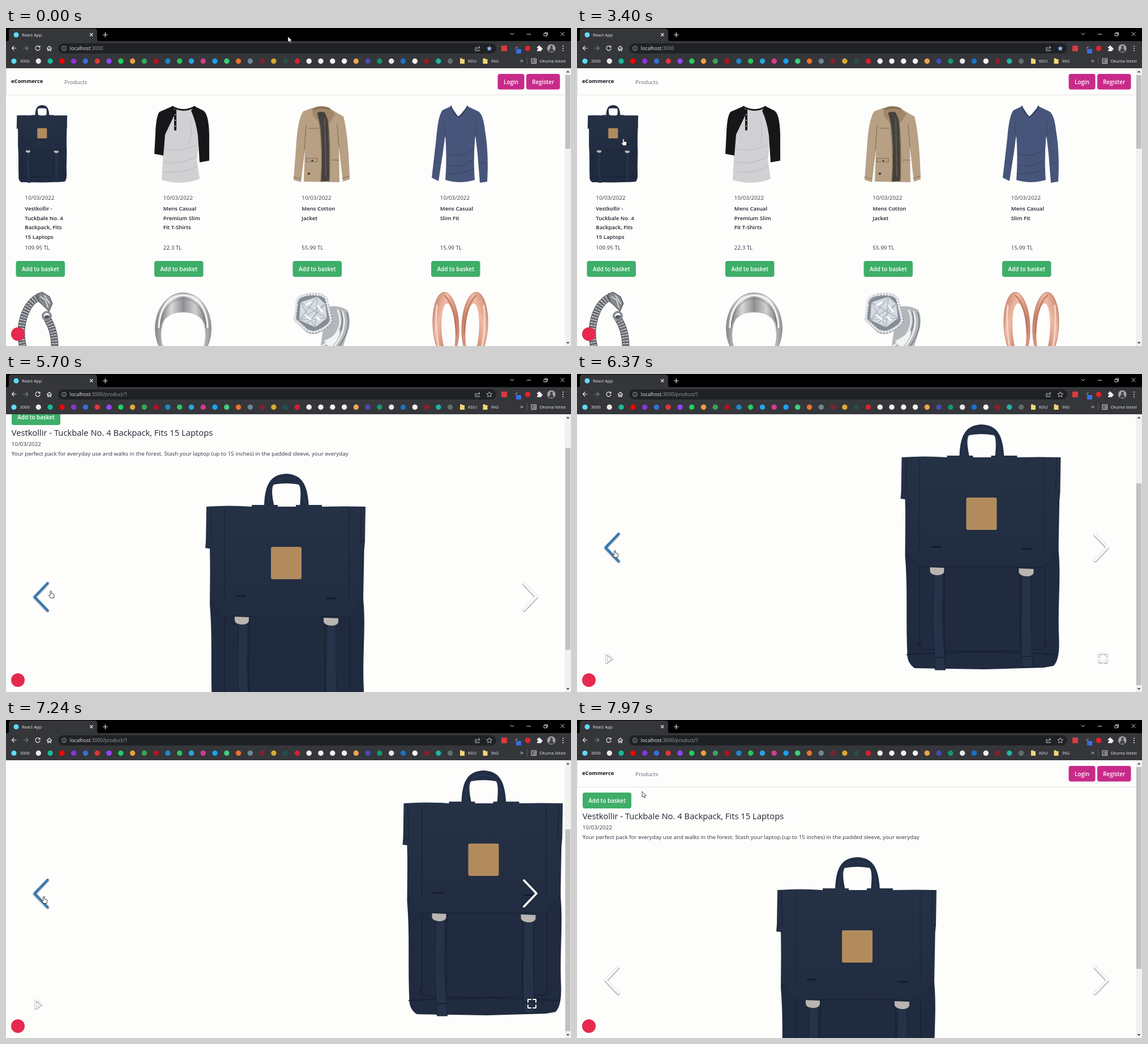
Recreate the animation shown at these times as an HTML page. Size 998 by 561 pixels, loop 8000 ms.

```html
<!DOCTYPE html>
<html lang="en">
<head>
<meta charset="utf-8">
<title>Shop demo</title>
<style>
  html, body { margin: 0; width: 100%; height: 100%; overflow: hidden; background: #fdfdfc; }
  svg { display: block; width: 998px; height: 561px; font-family: "Open Sans", "Noto Sans", sans-serif; }
  .line { fill: none; stroke-linecap: round; stroke-linejoin: round; }
  .control { filter: drop-shadow(0 1.4px 1.2px #1a1a1aaa); }
</style>
</head>
<body>
<svg id="stage" viewBox="0 0 998 561" xmlns="http://www.w3.org/2000/svg"></svg>
<script>
const LOOP = 8000, MAX_SCROLL = 153, SLIDE_WIDTH = 987, SLIDE_TIME = 440;
const OPENED = 3700, SLIDES = [6309, 7139], COLUMN = 244.5;

// Markup helpers
const path = (d, fill, more = '') => `<path d="${d}" fill="${fill}" ${more}/>`;
const line = (d, stroke, width = 1, more = '') =>
  `<path class="line" d="${d}" stroke="${stroke}" stroke-width="${width}" ${more}/>`;
const rect = (x, y, w, h, fill, r = 0) =>
  `<rect x="${x}" y="${y}" width="${w}" height="${h}" rx="${r}" fill="${fill}"/>`;
const circle = (x, y, r, fill, more = '') => `<circle cx="${x}" cy="${y}" r="${r}" fill="${fill}" ${more}/>`;
const text = (x, y, size, fill, value, weight = 400) =>
  `<text x="${x}" y="${y}" font-size="${size}" fill="${fill}" font-weight="${weight}">${value}</text>`;
const button = (x, y, w, h, fill, label) =>
  rect(x, y, w, h, fill, 4) +
  `<text x="${x + w / 2}" y="${y + h / 2 + 4}" font-size="9.9" fill="#fff" font-weight="600" text-anchor="middle">${label}</text>`;

const INK = '#1e2430', GREY = '#9aa0a6', LIGHT = '#e8eaed', GREEN = '#3eae68', PINK = '#c82a8a';

const bag = `<g id="bag">
  ${path('M456 147 C457 113 464 90 495 89 C526 90 533 113 535 147 H519 C521 125 521 113 517 108 Q495 104 473 108 C469 113 469 125 474 147Z', '#222e44')}
  ${line('M463 142 C464 112 472 97 495 97 C518 97 526 112 528 142', '#313e54', 1)}
  ${path('M361 205 L360 320 C365 380 361 430 364 495 Q364 510 377 519 L500 521 L605 518 L622 515 Q633 505 632 470 C629 410 636 360 631 310 L633 205Z', '#202b3f')}
  ${path('M354 147 Q395 144 434 147 V144 H480 V147 H512 V144 H558 V147 Q600 146 635 147 L634 208 L633 220 L629 222 L631 310 L604 341 Q500 339 382 341 L362 313 L360 221 L352 220 L353 208Z', 'url(#cloth)')}
  ${line('M362 313 L382 341 Q500 339 604 341 L631 310 M354 208 L363 209 M633 208 L627 209 M361 148 L363 208 M628 148 L626 208 M386 150 V310 M606 150 V310', '#172133', 1)}
  ${line('M386 343 V480 M607 343 V480 M430 342 Q428 440 430 487 M563 342 V487 M380 474 L392 486 Q500 492 604 485 L613 475', '#151e2e', 1.2)}
  ${line('M364 495 Q500 486 628 495', '#18233a', 3)}
  ${line('M407 305 H423 M567 309 H583', '#111a2a', 2.5)}
  ${path('M411 353 H427 L426 440 L431 522 H413 L409 440Z M567 355 H583 V440 L585 517 H566 L565 440Z', '#263249', 'stroke="#172133"')}
  ${line('M413 500 H430 M566 498 H584', '#141d2e', 1.5)}
  ${path('M404 341 L429 342 V349 Q427 355 416 355 Q405 354 404 348Z M561 343 L587 344 V351 Q585 357 574 357 Q563 356 561 350Z', '#b9b5b0')}
  ${rect(468, 218, 54, 57, '#b28b5d', 3)}
</g>`;

const shirt = path('M297 140 Q314 148 331 140 L340 165 Q342 200 337 232 L342 266 Q310 279 275 268 Q277 225 281 180 L287 155Z', '#d1d1d4')
  + line('M282 213 Q300 220 337 207 M280 236 Q310 243 337 226 M279 254 Q315 257 338 244 M325 165 Q330 190 322 205', '#bcbcc0', 1.2)
  + path('M294 138 L271 148 Q265 156 264 185 L262 222 L278 225 L281 188 L300 148Z M333 138 L349 146 Q358 152 359 188 L359 234 L342 237 L339 190 Q336 166 327 146Z', '#17171a')
  + line('M294 139 Q314 150 333 139', '#17171a', 3) + line('M299 145 V179', '#17171a', 4)
  + [153, 163, 173].map(y => circle(299, y, 1, '#ddd')).join('');

const jacket = path('M541 141 L525 147 Q516 160 513 200 L508 268 L521 272 L528 215 L526 271 L589 272 L588 210 L595 271 L607 267 Q605 190 596 156 L573 143Z', '#b7a084')
  + path('M549 148 L567 147 Q572 185 571 270 L556 271 Q560 215 555 172Z', '#45423d')
  + line('M563 160 L565 262', '#5e5b53', 2)
  + path('M541 142 Q556 134 572 141 L582 152 L571 168 L563 149 Q556 146 549 150 L553 168 L542 154Z', '#a18768')
  + line('M545 143 Q557 138 570 143', '#6e5a45', 1.6)
  + line('M553 166 Q560 215 556 271 M569 164 Q574 215 571 271 M527 215 L530 172 M588 210 L585 170 M508 263 L521 266 M594 265 L606 262', '#846e55', 1.2)
  + line('M530 230 H550 V236 H530Z M575 233 H588 M535 177 H551', '#7f6a52', 1.1)
  + circle(541, 234, 1.6, '#3a3028') + circle(535, 257, 2, '#3a3028');

const sweater = path('M786 138 L771 145 Q763 155 760 195 L752 264 L764 270 L772 218 L776 188 Q779 230 776 268 Q802 276 828 268 Q825 230 829 188 L833 222 L837 273 L850 271 Q853 220 846 180 Q843 152 834 147 L815 138 L799 157Z', '#47557a')
  + line('M786 138 Q790 151 799 157 Q810 150 815 138', '#36415d', 2)
  + line('M776 192 L774 166 M829 192 L831 166 M780 222 Q805 230 825 214 M779 242 Q805 248 826 232 M779 257 Q810 258 826 248 M757 235 L767 238 M836 240 L848 236', '#3a4764', 1.2);

const chain = (d, width) => line(d, '#56595d', width)
  + line(d, '#b4b7bb', width - 2, 'stroke-dasharray="2.6 2.4" style="stroke-linecap:butt"') + line(d, '#777b80', 1.3);
const bracelet = chain('M31 566 C20 530 33 484 60 474', 13) + chain('M73 513 Q87 535 86 566', 13)
  + path('M55 469 L64 466 L77 474 L82 486 L76 500 L65 489 L58 483Z', '#85888c', 'stroke="#3c3f42"')
  + line('M61 474 L70 480 L74 493 M68 472 L77 486', '#e4e6e8', 1.6)
  + circle(72, 508, 7, 'none', 'stroke="#8a8d91" stroke-width="4"');

const band = '<ellipse cx="313" cy="530" rx="49.5" ry="63" fill="url(#steel)" stroke="#898b8e"/>'
  + '<ellipse cx="313" cy="542" rx="39" ry="50" fill="#fdfdfc"/>'
  + path('M271 530 C272 486 296 474 313 474 C330 474 354 486 355 530 C345 492 281 492 271 530Z', 'url(#inside)')
  + line('M270 528 C272 453 354 453 356 528', '#f4f4f4', 3.2)
  + line('M273 530 C276 460 350 460 353 530', '#77797c', 1);

const diamond = path('M555 566 L566 492 Q588 488 603 498 Q609 510 606 528 L594 566Z', '#b3b7bb')
  + line('M556 562 C588 545 596 520 586 498 M576 566 C596 545 602 520 594 500', '#eceeef', 3)
  + line('M566 562 C594 542 598 520 592 500 M588 562 C604 540 608 520 602 502', '#73777c', 1.6)
  + path('M572 566 Q591 548 590 532 Q578 545 562 552Z', '#f2f3f3')
  + path('M513 488 Q510 470 536 468 Q562 465 568 478 L577 514 Q577 526 554 537 Q542 543 530 536 L508 515Z', '#878d95')
  + line('M513 488 Q512 472 536 470 Q562 468 566 479 L574 514 Q574 524 553 534 Q542 539 531 533 L510 514Z', '#e2e5e9', 5, 'stroke-dasharray=".2 5"')
  + path('M520 484 L550 474 L564 487 L567 512 L546 528 L518 515Z', '#d7dce2')
  + line('M520 484 L546 528 L550 474 L518 515 L567 512 L520 484 M564 487 L518 515 M564 487 L532 521', '#a3adb9', 1.2)
  + line('M530 489 L538 484 M551 490 L558 500 M530 507 L538 514 M548 510 L554 515', '#fff', 3);

const hoop = (x, flip) => `<g transform="translate(${x} 525) scale(${flip} 1) rotate(-3)">
  <ellipse rx="23" ry="59" fill="url(#rose)" stroke="#a96752" stroke-width=".7"/>
  <ellipse cx="4" cy="8" rx="12" ry="47" fill="#fdfdfc"/>
  ${line('M0 -53 Q17 -38 18 15', '#b9745e', 2)}${line('M-14 -36 Q-20 0 -14 42', '#f5d5c8', 3)}</g>`;

// Home page
const products = [
  [['Vestkollir -', 'Tuckbale No. 4', 'Backpack, Fits', '15 Laptops'], '109.95'],
  [['Mens Casual', 'Premium Slim', 'Fit T-Shirts'], '22.3'],
  [['Mens Cotton', 'Jacket'], '55.99'],
  [['Mens Casual', 'Slim Fit'], '15.99']
];
const card = ([title, price], i) => `<g transform="translate(${i * COLUMN})">
  ${text(33.3, 303, 9.85, '#3a3f48', '10/03/2022')}
  ${title.map((row, n) => text(33.3, 322 + n * 16.5, 9.6, INK, row, 600)).join('')}
  ${text(33.3, 391, 9.85, '#2d3440', price + ' TL')}
  ${button(17.5, 411, 86.5, 28, GREEN, 'Add to basket')}</g>`;
const home = `<g id="home">${products.map(card).join('')}
  <use href="#bag" transform="translate(-92.6 107.9) scale(.316)"/>
  ${shirt}${jacket}${sweater}${bracelet}${band}${diamond}${hoop(777, 1)}${hoop(828, -1)}</g>`;

// Product page
const chevron = (id, x, dir) =>
  `<path id="${id}" class="line control" d="M${x} 436 l${dir * 22} 23 l${-dir * 22} 23" stroke="#fff" stroke-width="3.8"/>`;
const product = `<g id="product">
  ${button(10, 128, 86, 28, GREEN, 'Add to basket')}
  ${text(9.7, 174.5, 14.8, INK, 'Vestkollir - Tuckbale No. 4 Backpack, Fits 15 Laptops')}
  ${text(9.7, 193, 9.85, '#3a3f48', '10/03/2022')}
  ${text(9.7, 209.5, 9.83, '#2d3440', 'Your perfect pack for everyday use and walks in the forest. Stash your laptop (up to 15 inches) in the padded sleeve, your everyday')}
  <use id="leaving" href="#bag"/><use id="entering" href="#bag"/>
  ${chevron('previous', 73, -1)}${chevron('next', 915, 1)}
  <g class="control">${line('M52 646 L63 654 L52 662Z M927 646 h-5 v5 M931 646 h5 v5 M936 656 v5 h-5 M922 656 v5 h5', '#fff', 1.9)}</g>
</g>`;

const header = line('M0 118 H987 M.5 71 V118', '#e3e3df')
  + text(9, 97, 9.5, '#101318', 'eCommerce', 700) + text(103.3, 98.5, 9.7, '#626873', 'Products')
  + button(868.5, 81, 47, 27.5, PINK, 'Login') + button(919, 81, 59.5, 27.5, PINK, 'Register');

const scrollbar = rect(987, 71, 11, 490, '#f1f1f0') + '<rect id="thumb" x="988" width="9" fill="#c1c1c1"/>'
  + path('M989.5 78.5 L992.5 75 L995.5 78.5Z M989.5 554 L992.5 557.5 L995.5 554Z', '#555');

// Browser window
const bookmarks = ('#e8e8e8 #19b99a #f00 #8b33d8 #3a6fd6 #e0353a #9146ff #1ed05f #e8a33a #37a45a #b5121b #1f88c9 '
  + '#2fc45a #2aa5e0 #d63a8c #1da1f2 #3dd07c #e8742a #6b8796 #7d2432 #d9a92c #24504c #d81f2f #f2f2f2 #f2f2f2 '
  + '#f2f2f2 #f2f2f2 #eea650 #4a4bb5 #12996b #e8e8e8 #1873c9 #f5f5f5 #8e1f25 #24b3a0 #61706a').split(' ');
const folder = x => path(`M${x} 53.5 h3.5 l1 1.5 h3.5 v8 h-8Z`, '#f4d774');
const browser = rect(0, 0, 998, 24, '#000') + rect(0, 23, 998, 48, '#35363a')
  + path('M0 24 Q5 24 5 19 V6 Q5 1 10 1 H156 Q161 1 161 6 V19 Q161 24 166 24Z', '#35363a')
  + circle(18, 12, 4.5, '#61dafb') + text(28, 14.6, 7.5, LIGHT, 'React App')
  + line('M148.5 9.5 l4.6 4.6 m0 -4.6 l-4.6 4.6 M171.5 12 h7.6 m-3.8 -3.8 v7.6', LIGHT, 1.2)
  + line('M891 9 l3 3 l3 -3 M920 11 h7 M950.5 9.5 h4.5 v4.5 h-4.5Z M952 9.5 V8 H956.5 V12.5 H955 M980 7.5 l6 6 m0 -6 l-6 6', '#d6d6d6', 1)
  + line('M18 35.5 H10.5 m3.5 -3.5 l-3.5 3.5 l3.5 3.5 M59.5 33.5 A4 4 0 1 0 60 36.5 M60 31.5 V34 H57.5 M72.5 36 L76.5 32 L80.5 36 M73.7 35.5 V40 H75.5 V37 H77.5 V40 H79.3 V35.5', LIGHT, 1.2)
  + line('M31.5 35.5 H39 m-3.5 -3.5 l3.5 3.5 l-3.5 3.5', '#7d8085', 1.2)
  + rect(92, 27, 774, 18, '#202124', 9)
  + circle(102.5, 36, 3.9, 'none', 'stroke="#9aa0a6"') + line('M102.5 35.7 V38 M102.5 33.9 v.1', GREY, 1)
  + `<text x="112.8" y="39.2" font-size="8.7" fill="${LIGHT}">localhost<tspan fill="${GREY}">:3000<tspan id="route"></tspan></tspan></text>`
  + line('M831 34.5 H829 V40 H836 V38 M831.5 37.5 Q832 34 836.5 34 M834.8 32 L837 34 L834.8 36', '#c2c5c9', 1)
  + '<path id="star" d="M853.7 31.3 l1.4 3 3.3 .4 -2.4 2.3 .6 3.3 -2.9 -1.6 -2.9 1.6 .6 -3.3 -2.4 -2.3 3.3 -.4Z"/>'
  + rect(875, 31, 10, 10, '#d93a3e', 1) + rect(901, 37, 9, 8, '#3b6ee0', 1) + line('M900 36 L903 33', '#8a8d91', 1.5)
  + circle(921.5, 36, 4.8, '#e0242c')
  + path('M938 33 h2.3 a1.6 1.6 0 1 1 3 0 h2.3 v2.4 a1.6 1.6 0 1 1 0 3 v2.4 h-7.6 v-2.5 a1.5 1.5 0 1 0 0 -2.9Z', '#f1f1f1')
  + circle(963.3, 36, 7.3, '#a4a5a8') + path('M959 42 Q959 37 962 36 Q960 31 964 31 Q967 32 965 36 Q968 38 967.5 42Z', '#424349')
  + [32, 36, 40].map(y => circle(984, y, 1, LIGHT)).join('')
  + circle(14, 58.5, 4.6, '#61dafb') + text(24.7, 61.4, 7.5, LIGHT, '3000')
  + bookmarks.map((color, i) => circle(57.3 + i * 20.78, 58.5, 4.7, color)).join('')
  + folder(802) + text(816, 61.4, 7.5, LIGHT, 'KDU') + folder(842.5) + text(857, 61.4, 7.5, LIGHT, 'İNG')
  + line('M909 56.5 l1.5 1.7 l-1.5 1.7 M911.5 56.5 l1.5 1.7 l-1.5 1.7', LIGHT, .9) + line('M920.5 52 V64', '#606368', .8)
  + line('M928.5 54 h8 v8.5 h-8Z M930 56.5 h.2 M932 56.5 h3 M930 58.5 h.2 M932 58.5 h3 M930 60.5 h.2 M932 60.5 h3', LIGHT, .9)
  + text(942.5, 61.4, 7.4, LIGHT, 'Okuma listesi');

const cursor = `<g id="cursor">
  ${path('M0 0 V10 L2.3 8 L4 11.6 L5.7 10.8 L4.1 7.3 H7.2Z', '#fff', 'id="arrow" stroke="#222" stroke-width=".8"')}
  ${path('M-1.2 1 Q0 -.8 1.2 1 V5 L5 5.8 Q6 6.2 5.8 8 L5 12.5 H-.5 L-3.6 8.2 Q-3.3 6.6 -1.2 8Z', '#fff', 'id="hand" stroke="#222" stroke-width=".9"')}
</g>`;

const gradient = (id, stops, x2, y2) => `<linearGradient id="${id}" x2="${x2}" y2="${y2}">
  ${stops.map((c, i) => `<stop offset="${i / (stops.length - 1)}" stop-color="${c}"/>`).join('')}</linearGradient>`;

const stage = document.getElementById('stage');
stage.innerHTML = `<defs>${bag}
  ${gradient('cloth', ['#253145', '#212c41'], 0, 1)}
  ${gradient('steel', ['#85878a', '#dedede', '#b6b8ba', '#ececec', '#8f9093'], 1, 0)}
  ${gradient('inside', ['#77797c', '#d8d8d8', '#8d8f92', '#d0d0d0', '#77797c'], 1, 0)}
  ${gradient('rose', ['#b9735c', '#efb9a3', '#c98068', '#e8ab94'], 1, 1)}</defs>
  ${rect(0, 0, 998, 561, '#fdfdfc')}
  <g id="page">${header}${home}${product}</g>${scrollbar}${browser}
  ${circle(21, 540, 12, '#e5294f')}${cursor}`;

const el = Object.fromEntries([...stage.querySelectorAll('[id]')].map(node => [node.id, node]));
const set = (id, attrs) => Object.entries(attrs).forEach(([key, value]) => el[id].setAttribute(key, value));

// Motion
const clamp = v => Math.max(0, Math.min(1, v));
const smooth = v => v * v * (3 - 2 * v);
// Same curve as CSS ease-out: solve the Bezier parameter by bisection
const easeOut = v => {
  let low = 0, high = 1;
  for (let i = 0; i < 20; i++) {
    const s = (low + high) / 2;
    if (1.74 * s * s - .74 * s ** 3 < v) low = s; else high = s;
  }
  return v <= 0 ? 0 : smooth(high);
};
const pointerPath = [
  [0, 498, 15], [1330, 498, 15], [2130, 210, 128], [2730, 82, 195], [4430, 82, 195], [5200, 87, 428],
  [5450, 87, 428], [6040, 67, 311], [7300, 67, 311], [7500, 106, 284], [7740, 115, 126], [LOOP, 115, 126]
];
function pointerAt(t) {
  const i = pointerPath.findIndex(([time]) => time > t);
  const [t0, x0, y0] = pointerPath[i - 1], [t1, x1, y1] = pointerPath[i];
  const p = smooth((t - t0) / (t1 - t0));
  return [x0 + (x1 - x0) * p, y0 + (y1 - y0) * p];
}
const scrollAt = t => MAX_SCROLL * (easeOut(clamp((t - 5620) / 280)) - easeOut(clamp((t - 7720) / 240)));

function draw(t) {
  const opened = t >= OPENED, scroll = scrollAt(t), [x, y] = pointerAt(t);
  const overPrevious = opened && x < 112 && Math.abs(y + scroll - 459) < 60;
  const column = x % COLUMN;
  const overProduct = !opened && y > 136 && y < 273 && column > 18 && column < 110;
  const hand = overPrevious || overProduct;

  set('home', { visibility: opened ? 'hidden' : 'visible' });
  set('product', { visibility: opened ? 'visible' : 'hidden' });
  set('page', { transform: `translate(0 ${-scroll})` });
  set('thumb', { y: 83 + 110 * scroll / MAX_SCROLL, height: opened ? 356 : 130 });
  el.route.textContent = opened ? '/product/1' : '';
  set('star', opened ? { fill: 'none', stroke: '#c2c5c9' } : { fill: '#8ab4f8', stroke: 'none' });

  const start = SLIDES.filter(s => s <= t).pop() ?? Infinity;
  const shift = SLIDE_WIDTH * easeOut(clamp((t - start) / SLIDE_TIME));
  set('leaving', { x: shift, y: MAX_SCROLL });
  set('entering', { x: shift - SLIDE_WIDTH, y: MAX_SCROLL });
  set('previous', {
    stroke: overPrevious ? '#337ab7' : '#fff',
    transform: `translate(62 459) scale(${overPrevious ? 1.05 : 1}) translate(-62 -459)`
  });

  set('cursor', { transform: `translate(${x} ${y})` });
  set('hand', { visibility: hand ? 'visible' : 'hidden' });
  set('arrow', { visibility: hand ? 'hidden' : 'visible' });
}

const begin = performance.now();
function tick() {
  draw((performance.now() - begin) % LOOP);
  requestAnimationFrame(tick);
}
tick();
</script>
</body>
</html>
```
